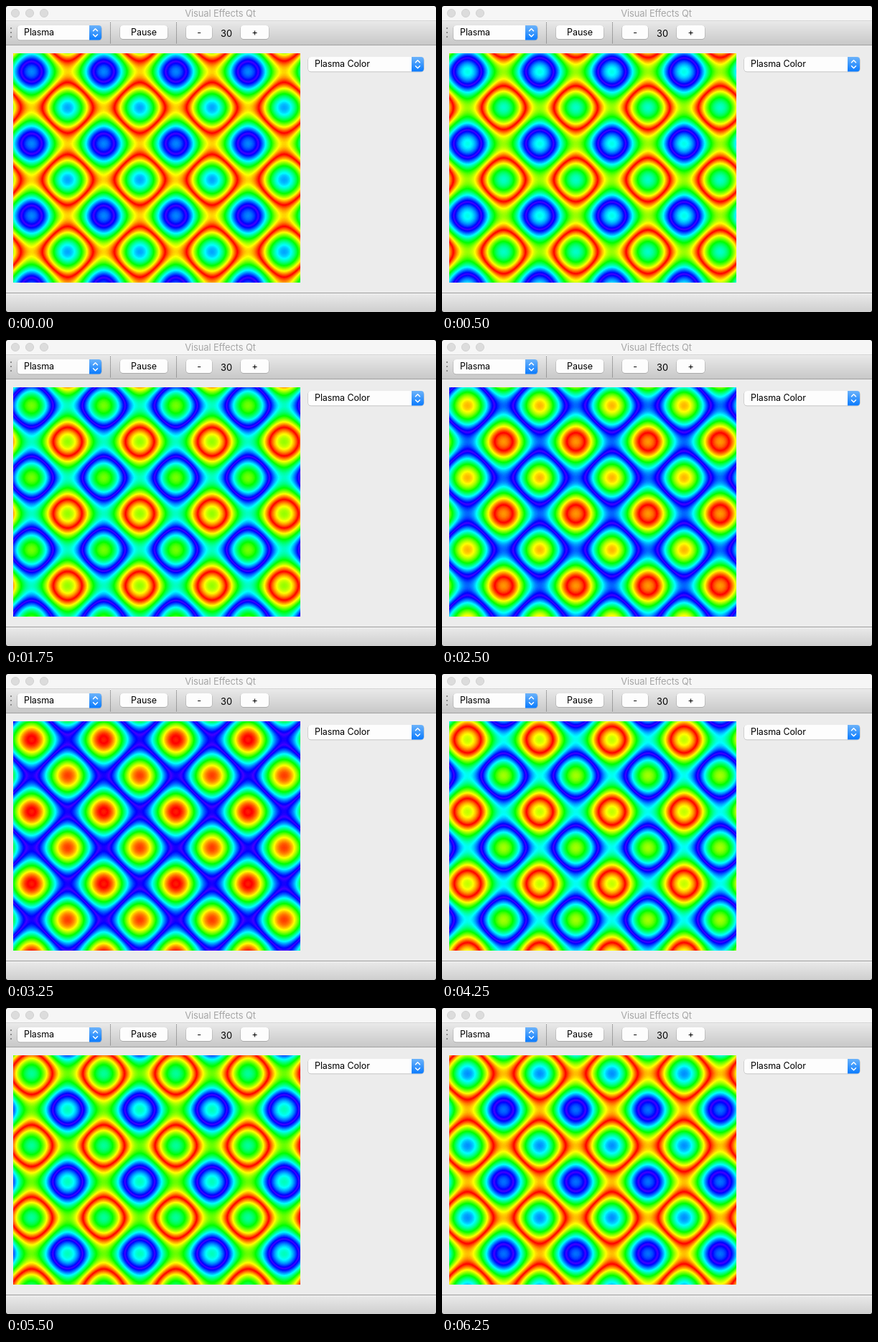
Write an HTML page with a canvas that moves like this. It is 599 px wide and 427 px high and loops after 6.5 s.

```html
<!DOCTYPE html>
<html lang="en">
<head>
<meta charset="utf-8">
<title>Visual Effects Qt</title>
<style>
html, body { margin: 0; width: 100%; height: 100%; overflow: hidden; background: #ececec; }
canvas { display: block; }
</style>
</head>
<body>
<canvas id="stage" width="599" height="427"></canvas>
<script>
const W = 599, H = 427;
const ctx = document.getElementById('stage').getContext('2d');
const FONT = 'Inter, Roboto, sans-serif';

function fade(y0, y1, top, bottom) {
  const g = ctx.createLinearGradient(0, y0, 0, y1);
  g.addColorStop(0, top);
  g.addColorStop(1, bottom);
  return g;
}

function rect(x, y, w, h, fill) {
  ctx.fillStyle = fill;
  ctx.fillRect(x, y, w, h);
}

function round(x, y, w, h, r, fill) {
  ctx.fillStyle = fill;
  ctx.beginPath();
  ctx.roundRect(x, y, w, h, r);
  ctx.fill();
}

function text(str, x, y, size, align = 'left', color = '#000') {
  ctx.font = `${size}px ${FONT}`;
  ctx.letterSpacing = '-0.1px';
  ctx.textAlign = align;
  ctx.fillStyle = color;
  ctx.fillText(str, x, y);
}

function button(x, y, w, h) {
  round(x - 0.5, y, w + 1, h + 0.8, 4.5, 'rgba(0,0,0,.24)');
  round(x, y, w, h, 4, '#fdfdfd');
}

function combo(x, y, w, h, label) {
  button(x, y, w, h);
  const bx = x + w - 17, cx = bx + 8.5, cy = y + h / 2;
  round(bx, y, 17, h, [0, 4, 4, 0], fade(y, y + h, '#6cb3fa', '#0a7bfe'));
  ctx.strokeStyle = '#fff';
  ctx.lineWidth = 1.5;
  ctx.lineCap = ctx.lineJoin = 'round';
  for (const s of [-1, 1]) {
    ctx.beginPath();
    ctx.moveTo(cx - 3, cy + s * 2.5);
    ctx.lineTo(cx, cy + s * 5.5);
    ctx.lineTo(cx + 3, cy + s * 2.5);
    ctx.stroke();
  }
  text(label, x + 9, y + 14, 12.5);
}

function drawWindow() {
  rect(0, 0, W, H, '#1c1c1c');
  ctx.save();
  ctx.beginPath();
  ctx.roundRect(0, 0, W, H, 4);
  ctx.clip();
  rect(0, 0, W, H, '#ececec');

  // title bar and toolbar
  rect(0, 0, W, 20, '#f6f6f6');
  rect(0, 20, W, 1, '#d6d6d6');
  rect(0, 21, W, 33, fade(21, 54, '#e9e9e9', '#c8c8c8'));
  rect(0, 54, W, 1, '#a2a2a2');
  for (const x of [13, 33, 53]) {
    ctx.beginPath();
    ctx.arc(x, 10, 5.6, 0, 7);
    ctx.fillStyle = '#dcdcdc';
    ctx.fill();
    ctx.strokeStyle = '#cccccc';
    ctx.lineWidth = 0.8;
    ctx.stroke();
  }
  text('Visual Effects Qt', 298.5, 15, 12.9, 'center', '#a6a6a6');

  for (const y of [30, 36, 42]) rect(6, y, 2, 2, '#8c8c8c');
  for (const x of [145, 237])
    for (let y = 23; y < 52; y += 2) rect(x, y, 1, 1, '#666');

  combo(16, 27, 117, 20.5, 'Plasma');
  button(159, 27, 66, 19);
  text('Pause', 192, 41, 12.5, 'center');
  button(251, 27, 36, 19);
  text('-', 269, 41, 12.5, 'center');
  text('30', 307, 43, 12.8, 'center');
  button(327, 27, 39, 19);
  text('+', 346.5, 41, 12.5, 'center');

  combo(421, 71, 161, 20.5, 'Plasma Color');

  // status bar
  rect(0, 400, W, 1, '#999');
  rect(0, 401, W, 1, '#f5f5f5');
  rect(0, 402, W, 25, fade(402, 427, '#e9e9e9', '#cecece'));
  ctx.restore();
}

// Plasma: two crossed sine waves through a cycling hue palette
const PW = 400, PH = 320, STEP = 250, STEPS = 26;
const image = ctx.createImageData(PW, PH);
const pixels = new Uint32Array(image.data.buffer);
const field = new Uint8Array(PW * PH);
for (let y = 0; y < PH; y++)
  for (let x = 0; x < PW; x++)
    field[y * PW + x] = Math.round(128 + 63 * (Math.sin(x / 16) + Math.sin(y / 16)));

function hueColor(h) {
  const channel = n => {
    const k = (n + h / 60) % 6;
    return Math.round(255 * (1 - Math.max(0, Math.min(k, 4 - k, 1))));
  };
  return (255 << 24 | channel(1) << 16 | channel(3) << 8 | channel(5)) >>> 0;
}

const palette = Uint32Array.from({ length: 256 }, (_, i) =>
  hueColor(i < 128 ? 2 * i : 2 * (255.5 - i)));

function drawPlasma(step) {
  const shift = 153 + Math.round(step * 25 / 3);
  for (let i = 0; i < pixels.length; i++)
    pixels[i] = palette[(field[i] + shift) & 255];
  ctx.putImageData(image, 10, 66);
}

const start = performance.now();
let shown = -1;
function tick() {
  const step = Math.floor((performance.now() - start) / STEP) % STEPS;
  if (step !== shown) drawPlasma(shown = step);
  requestAnimationFrame(tick);
}

drawWindow();
tick();
</script>
</body>
</html>
```
